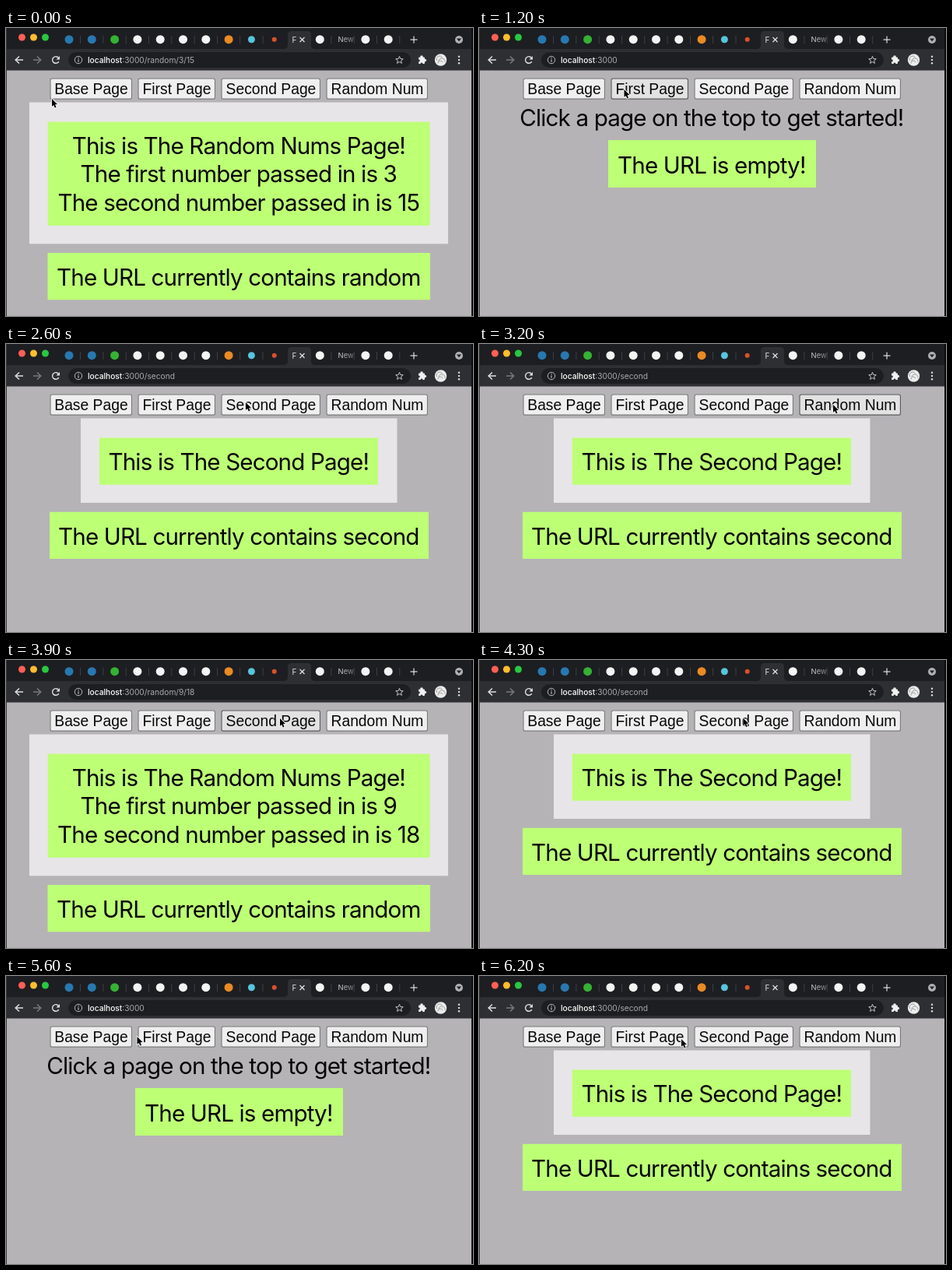
Animation of 600 by 370 pixels, one loop 6300 ms. Source, as an HTML page with a canvas:

```html
<!DOCTYPE html>
<html lang="en">
<head>
<meta charset="utf-8">
<title>Router demo</title>
<style>
html, body { margin: 0; width: 100%; height: 100%; overflow: hidden; background: #b5b3b6; }
canvas, svg { position: absolute; left: 0; top: 0; width: 600px; height: 370px; }
text {
  font: 29.6px Inter, sans-serif;
  font-variation-settings: "opsz" 14;
  letter-spacing: -0.86px;
  text-anchor: middle;
  fill: #050505;
}
</style>
</head>
<body>
<canvas id="stage"></canvas>
<svg id="copy" viewBox="0 0 600 370"></svg>
<script>
const LOOP = 6300, STEP = 100;
const GREEN = '#bdff75', PANEL = '#e7e5e8', BAR = '#2e2f33', DARK = '#1d1e21', PALE = '#dedfe1';
const canvas = document.getElementById('stage');
const copy = document.getElementById('copy');
const ctx = canvas.getContext('2d');
const ratio = window.devicePixelRatio || 1;
canvas.width = 600 * ratio;
canvas.height = 370 * ratio;
ctx.scale(ratio, ratio);

// Boxes are [left, top, right, bottom]; lines are [baseline, text].
const randomPage = (a, b) => ({
  path: `/random/${a}/${b}`, button: 3,
  panel: [30, 95.5, 568, 277.3], boxes: [[53.8, 120.5, 544.5, 253.8], [53.5, 289, 545, 349.2]],
  lines: [[161.5, 'This is The Random Nums Page!'],
    [198.3, `The first number passed in is ${a}`],
    [235, `The second number passed in is ${b}`],
    [331, 'The URL currently contains random']]
});
const namedPage = (name, button, panel, inner, outer) => ({
  path: '/' + name.toLowerCase(), button,
  panel: [panel[0], 95.5, panel[1], 204],
  boxes: [[inner[0], 120.5, inner[1], 180.8], [outer[0], 215.8, outer[1], 276]],
  lines: [[161.5, `This is The ${name} Page!`],
    [257.5, `The URL currently contains ${name.toLowerCase()}`]]
});
const base = {
  path: '', button: 0, boxes: [[166, 144, 433, 205]],
  lines: [[125.5, 'Click a page on the top to get started!'], [186.5, 'The URL is empty!']]
};
const first = namedPage('First', 1, [119, 480], [142, 456], [79, 519]);
const second = namedPage('Second', 2, [96, 502.5], [120, 478], [56, 543]);

const visits = [
  [0, randomPage(3, 15)], [600, base], [1600, first], [2500, second],
  [3300, randomPage(9, 18)], [4100, second], [5000, first], [5400, base], [6000, second]
];
const pointerPath = [
  [0, 59, 91], [500, 110, 80], [800, 112, 80], [1100, 186.5, 79], [1900, 186.5, 79],
  [2400, 308, 75], [2700, 308, 75], [3100, 455, 78], [3500, 455, 78], [3800, 352, 75],
  [4200, 352, 75], [4700, 230, 71], [5000, 228, 71], [5300, 112, 78], [5500, 112, 78],
  [5800, 330, 78], [6000, 330, 78], [6200, 260, 81]
];
const buttons = [[56.5, 162, 'Base Page'], [169.5, 269, 'First Page'],
  [276.5, 404, 'Second Page'], [411.5, 542, 'Random Num']];

function pointerAt(t) {
  const i = pointerPath.findIndex(p => p[0] > t);
  if (i < 0) return pointerPath[pointerPath.length - 1].slice(1);
  if (i === 0) return pointerPath[0].slice(1);
  const [t0, x0, y0] = pointerPath[i - 1], [t1, x1, y1] = pointerPath[i];
  const u = (t - t0) / (t1 - t0), e = u * u * (3 - 2 * u);
  return [x0 + (x1 - x0) * e, y0 + (y1 - y0) * e];
}

function rect(color, l, t, r, b) {
  ctx.fillStyle = color;
  ctx.fillRect(l, t, r - l, b - t);
}
function pill(color, l, t, r, b, radius) {
  ctx.fillStyle = color;
  ctx.beginPath();
  ctx.roundRect(l, t, r - l, b - t, radius);
  ctx.fill();
}
function disc(color, x, y, r) {
  ctx.fillStyle = color;
  ctx.beginPath();
  ctx.arc(x, y, r, 0, 7);
  ctx.fill();
}
function stroke(color, width, ...points) {
  ctx.strokeStyle = color;
  ctx.lineWidth = width;
  ctx.beginPath();
  points.forEach(([x, y]) => ctx.lineTo(x, y));
  ctx.stroke();
}
function ring(color, width, x, y, r, from = 0, to = 2 * Math.PI) {
  ctx.strokeStyle = color;
  ctx.lineWidth = width;
  ctx.beginPath();
  ctx.arc(x, y, r, from, to);
  ctx.stroke();
}
function label(text, x, y, color, font) {
  ctx.font = font;
  ctx.fillStyle = color;
  ctx.fillText(text, x, y);
  return x + ctx.measureText(text).width;
}

function drawTabs() {
  rect(DARK, 0, 0, 600, 27);
  ['#ff5f57', '#febc2e', '#28c840'].forEach((c, i) => disc(c, 20.5 + 15 * i, 12, 4.5));
  const tabX = i => 81 + 29.3 * i;
  for (let i = 0; i < 15; i++) {
    if (i !== 9 && i !== 10) rect('#46484c', tabX(i) + 14.2, 10, tabX(i) + 15, 20);
  }
  const white = '#f4f4f5';
  const icons = ['#2878b0', '#2878b0', '#35b233', white, white, white, white, '#e98a24',
    '#58c4dc', '#d9512c', null, white, null, white, white];
  icons.forEach((color, i) => {
    if (color) disc(color, tabX(i), 14.7, i === 9 ? 3 : i === 8 ? 4.5 : 5.5);
  });
  ctx.fillStyle = BAR;
  ctx.beginPath();
  ctx.moveTo(357, 27);
  ctx.quadraticCurveTo(362, 27, 362, 22);
  ctx.lineTo(362, 9);
  ctx.quadraticCurveTo(362, 4, 367, 4);
  ctx.lineTo(387, 4);
  ctx.quadraticCurveTo(392, 4, 392, 9);
  ctx.lineTo(392, 22);
  ctx.quadraticCurveTo(392, 27, 397, 27);
  ctx.fill();
  label('F', 367.5, 18.5, PALE, '10px Inter, sans-serif');
  stroke(PALE, 1.3, [377.5, 12], [383.5, 18]);
  stroke(PALE, 1.3, [383.5, 12], [377.5, 18]);
  const fade = ctx.createLinearGradient(430, 0, 449, 0);
  fade.addColorStop(0, '#c8cacd');
  fade.addColorStop(1, '#66686c');
  label('New', 426.5, 18.2, fade, '9.5px Inter, sans-serif');
  stroke(PALE, 1.2, [519.5, 15], [528.5, 15]);
  stroke(PALE, 1.2, [524, 10.5], [524, 19.5]);
  disc('#aeb0b3', 582, 15, 5);
  ctx.fillStyle = DARK;
  ctx.beginPath();
  ctx.moveTo(579, 13.5);
  ctx.lineTo(585, 13.5);
  ctx.lineTo(582, 17.2);
  ctx.fill();
}

function arrow(x, dir, color) {
  stroke(color, 1.5, [x - 5 * dir, 41], [x + 5 * dir, 41]);
  stroke(color, 1.5, [x, 36.5], [x + 4.8 * dir, 41], [x, 45.5]);
}

function drawToolbar(path) {
  rect(BAR, 0, 27, 600, 54.5);
  arrow(17, -1, PALE);
  arrow(40, 1, '#77797d');
  ring(PALE, 1.5, 64, 41, 4.3, 0.5, 5.5);
  ctx.fillStyle = PALE;
  ctx.beginPath();
  ctx.moveTo(69, 36);
  ctx.lineTo(69, 40.5);
  ctx.lineTo(64.5, 40.5);
  ctx.fill();

  pill(DARK, 80, 31, 520, 51, 10);
  ring('#b9bbbe', 1, 93, 41, 4.7);
  rect('#b9bbbe', 92.4, 40.3, 93.6, 43.7);
  rect('#b9bbbe', 92.4, 38, 93.6, 39.2);
  const font = '10.2px Inter, sans-serif';
  const x = label('localhost', 105, 44.5, '#ffffff', '500 ' + font);
  label(':3000' + path, x, 44.5, '#a8abaf', font);

  const star = Array.from({ length: 11 }, (_, i) => {
    const r = i % 2 ? 2.2 : 5, a = i * Math.PI / 5 - Math.PI / 2;
    return [505.5 + r * Math.cos(a), 41.3 + r * Math.sin(a)];
  });
  stroke('#c4c6c9', 1, ...star);

  pill('#f1f1f2', 530, 37.5, 538, 46, 1);
  disc('#f1f1f2', 534, 37, 1.8);
  disc('#f1f1f2', 538.3, 41.5, 1.8);
  disc(BAR, 530.4, 42, 1.4);
  disc(BAR, 534, 46, 1.4);

  disc('#ececec', 558.5, 41, 7.7);
  ring('#8b8b8b', 0.8, 557, 40, 4, 2.6, 5.8);
  ring('#8b8b8b', 0.8, 560, 43, 4, 3.3, 6.4);
  ring('#8b8b8b', 0.8, 558, 45, 3, 3, 6);
  for (const y of [36.8, 41, 45.2]) disc(PALE, 582, y, 1.2);
}

function drawButtons(hovered) {
  buttons.forEach(([l, r, text], i) => {
    const dark = i === hovered;
    pill(dark ? '#5a5a5a' : '#7a7a7a', l, 64.5, r, 91.7, 2.5);
    pill(dark ? '#e2e2e3' : '#efeff0', l + 1.1, 65.6, r - 1.1, 90.6, 1.6);
    ctx.textAlign = 'center';
    label(text, (l + r) / 2 + 0.2, 84.5, '#080808', '19.3px "Liberation Sans", Arial, sans-serif');
    ctx.textAlign = 'left';
  });
}

function drawPointer(x, y) {
  const outline = [[0, 0], [0, 9.8], [2.2, 7.9], [3.9, 11.5], [5.5, 10.8], [4, 7.3], [7, 7]];
  ctx.beginPath();
  outline.forEach(([dx, dy]) => ctx.lineTo(x + dx, y + dy));
  ctx.closePath();
  ctx.lineJoin = 'round';
  ctx.strokeStyle = '#f5f5f5';
  ctx.lineWidth = 1.8;
  ctx.stroke();
  ctx.fillStyle = '#000';
  ctx.fill();
  ctx.lineJoin = 'miter';
}

function hoveredButton(t, page) {
  const [x, y] = pointerAt(t), [px, py] = pointerAt(t - STEP);
  const resting = Math.hypot(x - px, y - py) < 1;
  if (!resting || y < 65 || y > 90) return -1;
  const i = buttons.findIndex(([l, r]) => x > l && x < r);
  return i === page.button ? -1 : i;
}

let shownPage;
function showCopy(page) {
  if (page === shownPage) return;
  shownPage = page;
  copy.replaceChildren(...page.lines.map(([y, text]) => {
    const node = document.createElementNS(copy.namespaceURI, 'text');
    node.setAttribute('x', 298.8);
    node.setAttribute('y', y);
    node.textContent = text;
    return node;
  }));
}

function draw(now) {
  const t = Math.floor(now % LOOP / STEP) * STEP;
  const page = visits.filter(v => v[0] <= t).pop()[1];
  rect('#b5b3b6', 0, 0, 600, 370);
  drawTabs();
  drawToolbar(page.path);
  if (page.panel) rect(PANEL, ...page.panel);
  page.boxes.forEach(box => rect(GREEN, ...box));
  drawButtons(hoveredButton(t, page));
  rect('#3a3a3c', 0, 0, 1, 370);
  rect('#0c0c0d', 598, 0, 600, 370);
  drawPointer(...pointerAt(t));
  showCopy(page);
}

let start;
function tick(now) {
  start ??= now;
  draw(now - start);
  requestAnimationFrame(tick);
}
draw(0);
requestAnimationFrame(tick);
</script>
</body>
</html>
```
